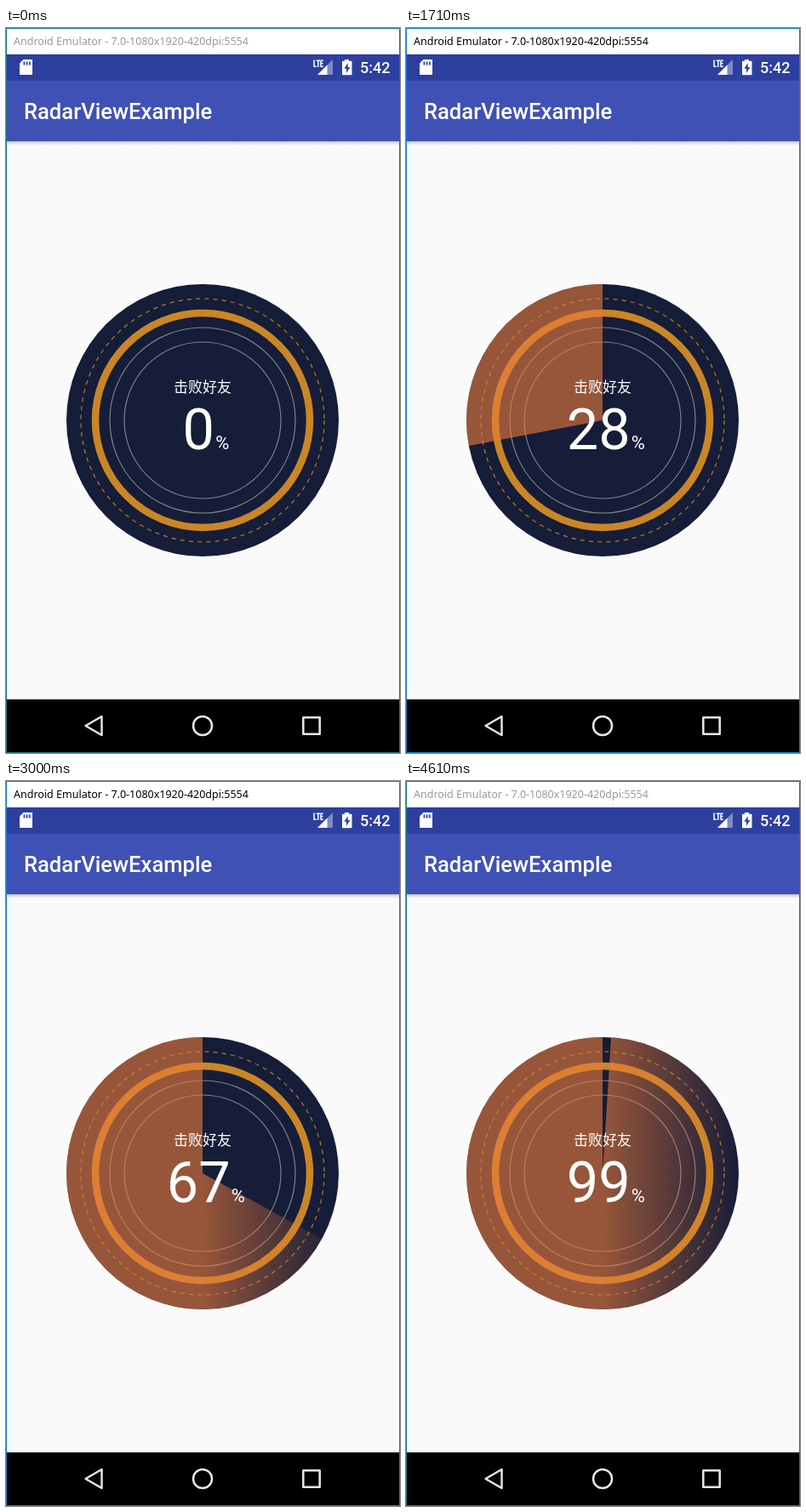
An HTML page with a canvas for the animation above (4670 ms loop, 463 by 852 pixels).

```html
<!DOCTYPE html>
<html lang="en">
<head>
<meta charset="utf-8">
<title>Radar view</title>
<style>
html, body { margin: 0; width: 100%; height: 100%; overflow: hidden; background: #fafafa; }
canvas { display: block; width: 463px; height: 852px; }
</style>
</head>
<body>
<canvas id="stage" width="463" height="852"></canvas>
<script>
const ctx = document.getElementById('stage').getContext('2d');
const W = 463, H = 852, LOOP = 4670;
const CX = 231, CY = 461, R = 160, TAU = Math.PI * 2;
const FOCUS = [680, 4610];
const CURSOR = { from: 230, stop: 680, hide: 1320 };

// time in ms and the number of screen updates of the sweep so far
const STEPS = [[880, 1], [1000, 3], [1380, 9], [1450, 10], [1710, 14], [1960, 18],
  [2030, 19], [2550, 27], [2620, 28], [3140, 36], [3190, 37], [3400, 40],
  [3660, 44], [3730, 45], [3970, 49]];

function percentAt(t) {
  if (t < STEPS[0][0]) return 0;
  let step = 49;
  for (let i = 1; i < STEPS.length; i++) {
    const [t0, s0] = STEPS[i - 1], [t1, s1] = STEPS[i];
    if (t < t1) {
      step = Math.floor(s0 + (s1 - s0) * (t - t0) / (t1 - t0) + 1e-6);
      break;
    }
  }
  return step * 2 + (step >= 23 ? 1 : 0);
}

function rect(x, y, w, h, color) {
  ctx.fillStyle = color;
  ctx.fillRect(x, y, w, h);
}

function polygon(points, fill, stroke, width = 1) {
  ctx.beginPath();
  points.forEach(([x, y]) => ctx.lineTo(x, y));
  ctx.closePath();
  if (fill) { ctx.fillStyle = fill; ctx.fill(); }
  if (stroke) { ctx.strokeStyle = stroke; ctx.lineWidth = width; ctx.stroke(); }
}

function ring(x, y, r, color, width, dash = []) {
  ctx.beginPath();
  ctx.arc(x, y, r, 0, TAU);
  ctx.setLineDash(dash);
  ctx.strokeStyle = color;
  ctx.lineWidth = width;
  ctx.stroke();
  ctx.setLineDash([]);
}

function text(str, x, y, font, color, align = 'left') {
  ctx.font = font;
  ctx.fillStyle = color;
  ctx.textAlign = align;
  ctx.fillText(str, x, y);
}

function drawStatusIcons() {
  const bar = '#2d3f9f';
  polygon([[20.5, 37], [31, 37], [31, 55], [16, 55], [16, 41.5]], '#fff');
  [20.5, 23.7, 26.9].forEach(x => rect(x, 39.5, 1.8, 4, bar));

  ctx.beginPath();
  ctx.moveTo(362, 37.5); ctx.lineTo(362, 45.2); ctx.lineTo(364.8, 45.2);
  ctx.moveTo(364.6, 38.2); ctx.lineTo(369, 38.2);
  ctx.moveTo(366.8, 38.2); ctx.lineTo(366.8, 46);
  ctx.moveTo(372.8, 38.2); ctx.lineTo(370, 38.2); ctx.lineTo(370, 45.2); ctx.lineTo(372.8, 45.2);
  ctx.moveTo(370, 41.6); ctx.lineTo(372.5, 41.6);
  ctx.strokeStyle = '#fff';
  ctx.lineWidth = 1.5;
  ctx.stroke();

  polygon([[384, 37], [384, 55], [366, 55]], '#7f8bc6');
  polygon([[377.5, 43.5], [377.5, 55], [366, 55]], '#fff');

  rect(398, 37, 5, 3, '#fff');
  ctx.beginPath();
  ctx.roundRect(395, 38.7, 11.5, 16.5, 1);
  ctx.fill();
  polygon([[401.7, 41], [397.4, 47.8], [400, 47.8], [400, 53], [404.2, 46], [401.7, 46]], bar);

  text('5:42', 416, 53, '500 18px Roboto, sans-serif', '#fff');
}

function drawScreen(active) {
  rect(0, 0, W, H, '#fafafa');
  rect(0, 0, W, 31, '#fff');
  text('Android Emulator - 7.0-1080x1920-420dpi:5554', 9, 20,
    '12.5px "Noto Sans", "Open Sans", sans-serif', active ? '#000' : '#999');

  const shadow = ctx.createLinearGradient(0, 132, 0, 138);
  shadow.addColorStop(0, 'rgba(0,0,0,.38)');
  shadow.addColorStop(0.4, 'rgba(0,0,0,.14)');
  shadow.addColorStop(1, 'rgba(0,0,0,0)');
  rect(0, 132, W, 6, shadow);
  rect(0, 31, W, 31, '#2d3f9f');
  rect(0, 62, W, 71, '#4051b5');
  text('RadarViewExample', 21, 107, '500 25.6px Roboto, sans-serif', '#fff');
  drawStatusIcons();

  rect(0, 789, W, 63, '#000');
  ctx.lineJoin = 'round';
  polygon([[93.5, 820], [112.5, 809], [112.5, 831]], null, '#e8e8e8', 2.4);
  ring(231, 820, 11, '#e8e8e8', 2.5);
  ctx.strokeRect(349.3, 810.3, 19.4, 19.4);

  ctx.strokeStyle = active ? '#0f7ad6' : '#1b7480';
  ctx.lineWidth = 1;
  ctx.strokeRect(0.5, 0.5, W - 1, H - 1);
}

function drawRadar(percent) {
  ctx.beginPath();
  ctx.arc(CX, CY, R, 0, TAU);
  ctx.fillStyle = '#161d38';
  ctx.fill();
  ring(CX, CY, 143, '#b87a2b', 1.2, [5.12, 5.12]);
  ring(CX, CY, 126, '#ca8626', 8.5);
  ring(CX, CY, 109, '#7f8287', 1.2);
  ring(CX, CY, 92, '#7f8287', 1.2);

  if (percent) {
    const fade = ctx.createLinearGradient(CX, 0, CX + R, 0);
    fade.addColorStop(0, 'rgba(233,122,59,.61)');
    fade.addColorStop(1, 'rgba(233,122,59,0)');
    const top = -Math.PI / 2;
    ctx.beginPath();
    ctx.moveTo(CX, CY);
    ctx.arc(CX, CY, R, top, top - TAU * percent / 100, true);
    ctx.closePath();
    ctx.fillStyle = fade;
    ctx.fill();
  }

  text('击败好友', CX, 428, '17px "Noto Sans CJK SC", "Noto Sans CJK", sans-serif', '#fff', 'center');

  // the digits are placed by the width of their ink, not their advance
  const big = '66.6px Roboto, sans-serif', small = '22px Roboto, sans-serif';
  const digits = String(percent);
  ctx.textAlign = 'left';
  ctx.font = small;
  const signWidth = ctx.measureText('%').width;
  ctx.font = big;
  const box = ctx.measureText(digits);
  const ink = box.actualBoundingBoxRight + box.actualBoundingBoxLeft;
  const x = CX - (ink + signWidth) / 2;
  text(digits, x, 495, big, '#fff');
  text('%', x + ink + 7.7, 495, small, '#fff');
}

function drawCursor(t) {
  if (t < CURSOR.from || t >= CURSOR.hide) return;
  const span = CURSOR.stop - CURSOR.from;
  const k = Math.min(1, Math.floor((t - CURSOR.from) / span * 7 + 1e-6) / 7);
  const left = (1 - k) ** 2;
  ctx.save();
  ctx.translate(Math.round(350 + 100 * left) + 0.5, Math.round(613 + 170 * left) + 0.5);
  ctx.lineJoin = 'miter';
  polygon([[0, 0], [0, 16], [3.7, 12.5], [6.3, 18], [8.6, 17], [6.2, 11.5], [11, 11.3]],
    '#fff', '#000', 1);
  ctx.restore();
}

function render(t) {
  drawScreen(t >= FOCUS[0] && t < FOCUS[1]);
  drawRadar(percentAt(t));
  drawCursor(t);
}

const start = performance.now();
function tick() {
  render((performance.now() - start) % LOOP);
  requestAnimationFrame(tick);
}
tick();
</script>
</body>
</html>
```
